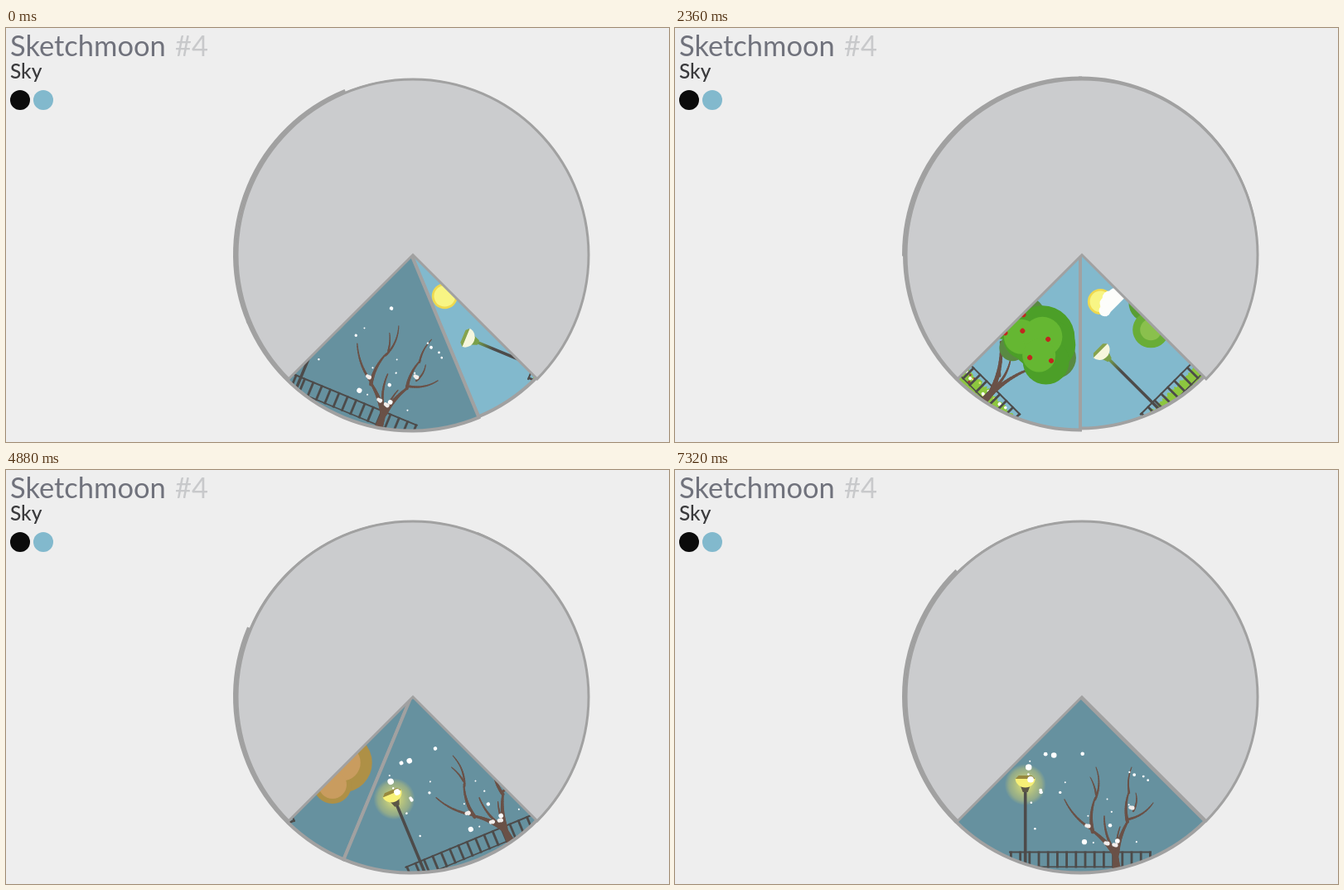
Write an HTML page with a canvas that moves like this. It is 800x500 px and loops after 7630 ms.

```html
<!DOCTYPE html>
<html lang="en">
<head>
<meta charset="utf-8">
<title>Sky</title>
<style>
  html, body { margin: 0; width: 100%; height: 100%; overflow: hidden; background: #eee; }
  canvas { position: absolute; left: 0; top: 0; }
  h1, h2 { position: absolute; margin: 0; left: 5px; font-family: Lato, sans-serif; white-space: nowrap; }
  h1 { top: 0; font-size: 34.5px; line-height: 42px; font-weight: 400; color: #70727c; }
  h1 span { position: absolute; left: 199px; color: #c8c9cb; }
  h2 { top: 37px; font-size: 24.5px; line-height: 30px; font-weight: 500; color: #3a3a3c; }
</style>
</head>
<body>
<canvas id="stage" width="800" height="500"></canvas>
<h1>Sketchmoon<span>#4</span></h1>
<h2>Sky</h2>
<script>
const ctx = document.getElementById('stage').getContext('2d');
const LOOP = 7630, STEP = 494, LEAD = 114;
const HUB = { x: 489, y: 273.5 };
const RIM = '#a1a1a1', WOOD = '#6a5147', IRON = '#4d4b4a';
const DAY = '#82b9cd', DUSK = '#66919f';
const rad = deg => deg * Math.PI / 180;

function seeded(seed) {
  return () => (seed = (seed * 16807) % 2147483647) / 2147483647;
}

function repeat(n, draw) {
  for (let i = 0; i < n; i++) draw(i);
}

function circle(x, y, r, color) {
  ctx.fillStyle = color;
  ctx.beginPath();
  ctx.arc(x, y, r, 0, 7);
  ctx.fill();
}

function rect(x, y, w, h, color) {
  ctx.fillStyle = color;
  ctx.fillRect(x, y, w, h);
}

function polygon(color, points) {
  ctx.fillStyle = color;
  ctx.beginPath();
  points.forEach(([x, y]) => ctx.lineTo(x, y));
  ctx.fill();
}

// Tapering limb; bend pushes its middle sideways in proportion to its length.
function limb(x0, y0, x1, y1, width, bend) {
  const dx = x1 - x0, dy = y1 - y0, n = 14;
  const at = t => {
    const bow = 2 * t * (1 - t) * bend;
    return [x0 + dx * t - dy * bow, y0 + dy * t + dx * bow];
  };
  ctx.strokeStyle = WOOD;
  ctx.lineCap = 'round';
  repeat(n, i => {
    ctx.lineWidth = width * (1 - .6 * i / n);
    ctx.beginPath();
    ctx.moveTo(...at(i / n));
    ctx.lineTo(...at((i + 1) / n));
    ctx.stroke();
  });
  ctx.lineCap = 'butt';
}

function sun(x, y) {
  circle(x, y, 15.5, '#efd94f');
  circle(x, y, 12.8, '#f8f584');
}

function lamp(x, lit) {
  if (lit) {
    const glow = ctx.createRadialGradient(x, 380, 4, x, 380, 25);
    glow.addColorStop(0, 'rgba(240,235,110,.8)');
    glow.addColorStop(.75, 'rgba(205,205,110,.42)');
    glow.addColorStop(1, 'rgba(205,205,110,0)');
    circle(x, 380, 25, glow);
  }
  const pole = ctx.createLinearGradient(0, 386, 0, 408);
  pole.addColorStop(0, lit ? IRON : '#76a44a');
  pole.addColorStop(1, IRON);
  rect(x - 1.8, 386, 3.6, 97, pole);
  polygon(lit ? '#5c5746' : '#7aa04a', [[x - 6, 381], [x + 6, 381], [x + 3, 389], [x - 3, 389]]);
  ctx.fillStyle = lit ? '#f7f077' : '#f6f6dd';
  ctx.beginPath();
  ctx.ellipse(x, 372.5, 12, 11, 0, 0, Math.PI);
  ctx.fill();
  polygon(lit ? '#98893f' : '#86a34c', [[x - 12, 373], [x - 8, 369], [x + 8, 369], [x + 12, 373]]);
}

function fence() {
  rect(403, 460.5, 172, 2, IRON);
  rect(403, 478.5, 172, 1.6, IRON);
  repeat(16, i => rect(404 + i * 11.2, 460.5, 2.8, 20, IRON));
}

function grass(flowers) {
  const rnd = seeded(31);
  const edge = [[400, 500]];
  for (let x = 402; x < 580; x += 2) edge.push([x, 465 + rnd() * 5]);
  polygon('#8cc63f', [...edge, [580, 500]]);
  repeat(flowers, i => {
    const color = ['#fff', '#9b3b35', '#e5e36f'][i % 3];
    circle(412 + rnd() * 150, 468 + rnd() * 11, 1.2 + rnd() * 1.2, color);
  });
}

function trunk() {
  limb(532, 485, 531, 452, 9, 0);
  limb(532, 472, 496, 416, 6.5, .15);
  limb(530, 456, 518, 421, 3.5, .15);
  limb(532, 470, 543, 416, 5.5, -.1);
  limb(524, 446, 510, 432, 3, 0);
}

// Leafy crown of four clumps, each with a lighter core.
function canopy(outer, inner) {
  const clumps = [[485, 398, 22, 13], [531, 381, 36, 22], [551, 402, 23, 17], [512, 398, 23, 18]];
  clumps.forEach(([x, y, r]) => circle(x, y, r, outer));
  clumps.forEach(([x, y, , core]) => circle(x, y, core, inner));
}

function apples() {
  circle(505, 388, 3, '#c1271f');
  repeat(6, i => {
    const a = i * Math.PI / 3;
    circle(513 + 42 * Math.cos(a), 389 + 18 * Math.sin(a), 3, '#c1271f');
  });
}

function cloud(x, color) {
  for (let i = -2; i <= 2; i++) circle(x + i * 7.5, 336 + 1.6 * i * i, 9 - Math.abs(i), color);
  rect(x - 19, 341, 38, 7.5, color);
}

function bird() {
  circle(456, 454.5, 4.8, '#353636');
  circle(453.5, 452.5, 3, '#353636');
  polygon('#353636', [[458, 451.5], [468, 450], [468, 451.5], [460, 454.5]]);
  rect(455, 458, 1, 4, '#353636');
}

function leaf(x, y, r, color) {
  const points = [];
  repeat(14, i => {
    const reach = i % 2 ? r * .5 : r, a = i * Math.PI / 7 + x;
    points.push([x + reach * Math.cos(a), y + reach * Math.sin(a)]);
  });
  polygon(color, points);
}

function spring() {
  const shade = '#598a42', green = '#4c9f28', light = '#65b732';
  sun(458, 330);
  grass(34);
  lamp(421.5, false);
  fence();
  bird();
  trunk();
  circle(495, 374, 25, shade);
  circle(556, 383, 25, shade);
  circle(511, 411, 16, shade);
  circle(477, 394, 25.5, green);
  circle(513, 390, 28, green);
  circle(528, 377, 39, green);
  circle(541, 376, 30, green);
  circle(551, 394, 28, green);
  circle(481, 394, 14, light);
  circle(509, 394, 21, light);
  circle(527, 376, 24, light);
  circle(540, 395, 20, light);
  apples();
}

function summer() {
  sun(466, 331);
  cloud(477, '#fdfdfb');
  grass(0);
  lamp(424, false);
  fence();
  trunk();
  circle(506, 373, 24, '#599e34');
  circle(556, 383, 24, '#599e34');
  canopy('#69ad37', '#8ac04d');
}

function autumn() {
  const rust = ['#a3482c', '#c9692f', '#7d4a38'];
  const rnd = seeded(77);
  cloud(483, '#e7e7e7');
  repeat(42, i => leaf(460 + rnd() * 62, 479 + rnd() * 7, 3 + rnd() * 2, rust[i % 3]));
  lamp(422.5, true);
  fence();
  trunk();
  canopy('#ae9046', '#c99c5f');
  leaf(507, 411, 6.5, rust[1]);
  leaf(489, 431, 4.5, rust[2]);
  leaf(506, 451, 5.5, rust[0]);
  leaf(481, 454, 3, rust[0]);
}

function bareTree() {
  limb(533, 485, 531, 455, 10, 0);
  limb(532, 466, 504, 436, 6.5, .1);
  limb(504, 437, 507, 396, 4.5, -.15);
  limb(507, 398, 508, 359, 2.6, .2);
  limb(503, 434, 470, 398, 3.2, -.15);
  limb(508, 392, 501, 371, 2.2, .1);
  limb(533, 464, 546, 425, 6, -.1);
  limb(546, 425, 548, 388, 4, -.15);
  limb(548, 390, 551, 359, 2.4, -.15);
  limb(546, 422, 577, 402, 2.8, .2);
  limb(553, 412, 556, 390, 2.4, .2);
  limb(530, 460, 518, 418, 3.6, -.15);
  limb(533, 460, 537, 431, 3, -.1);
}

function winter() {
  const rnd = seeded(2024);
  lamp(422.7, true);
  fence();
  bareTree();
  [[498, 430], [521, 451], [531, 453], [551, 408]].forEach(([x, y]) => {
    circle(x - 1.5, y - .5, 2.2, '#f2eeec');
    circle(x + 1, y, 2.6, '#f2eeec');
  });
  repeat(26, () => circle(424 + rnd() * 152, 342 + rnd() * 110, .9 + 3 * rnd() ** 2, '#fff'));
}

const QUARTERS = [
  { draw: spring, sky: DAY, radius: 212 },
  { draw: summer, sky: DAY, radius: 210 },
  { draw: autumn, sky: DUSK, radius: 213 },
  { draw: winter, sky: DUSK, radius: 213 }
];

function pie(x, y, r, from, to) {
  ctx.beginPath();
  ctx.moveTo(x, y);
  ctx.arc(x, y, r, rad(from), rad(to));
  ctx.closePath();
}

function quarter({ draw, sky, radius }, angle) {
  ctx.save();
  ctx.translate(HUB.x, HUB.y);
  ctx.rotate(rad(angle));
  ctx.translate(-HUB.x, -HUB.y);
  ctx.save();
  pie(HUB.x, HUB.y, radius, 45, 135);
  ctx.clip();
  rect(270, 270, 440, 230, sky);
  draw();
  ctx.restore();
  pie(HUB.x, HUB.y, radius, 45, 135);
  ctx.strokeStyle = RIM;
  ctx.lineWidth = 4;
  ctx.stroke();
  ctx.restore();
}

// Slow turn forward through three quarters, then a quick turn back.
function wheelAngle(step) {
  const m = (step + 5) % 16;
  return Math.min(22.5 * m - 180, 90 - 67.5 * (m - 12));
}

function render(step) {
  rect(0, 0, 800, 500, '#eee');
  circle(17, 87, 12, '#0b0b0b');
  circle(45, 87, 12, DAY);
  const angle = wheelAngle(step);
  QUARTERS.forEach((q, i) => quarter(q, angle - 90 * i));
  pie(491, 274, 212, 135, 405);
  ctx.fillStyle = '#cbccce';
  ctx.fill();
  ctx.strokeStyle = RIM;
  ctx.lineWidth = 3;
  ctx.stroke();
}

let shown = -1;
function tick() {
  const time = performance.now() % LOOP;
  const step = Math.floor((time + LEAD) / STEP);
  if (step !== shown) render(shown = step);
  requestAnimationFrame(tick);
}
tick();
</script>
</body>
</html>
```
